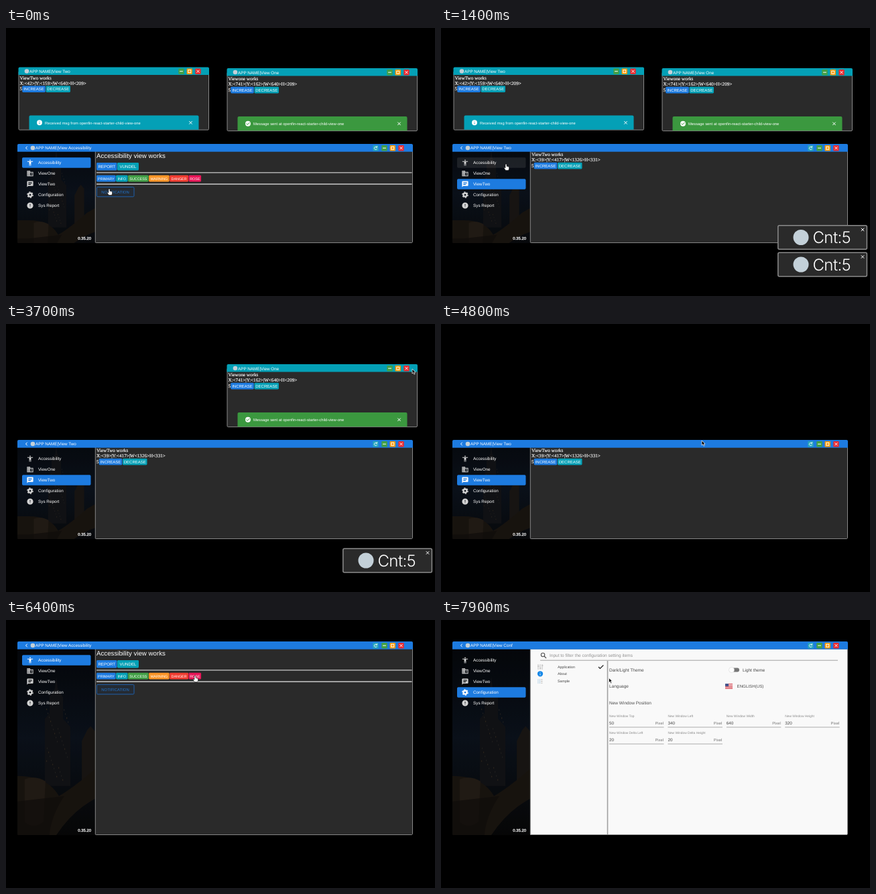
Recreate the animation shown at these times as an HTML page. Size 640x400 px, loop 8000 ms.

```html
<!DOCTYPE html>
<html lang="en">
<head>
<meta charset="utf-8">
<title>Multi window app</title>
<style>
html, body { margin: 0; width: 100%; height: 100%; overflow: hidden; background: #000; }
svg { display: block; width: 640px; height: 400px; font-family: "Liberation Sans", Arial, sans-serif; }
text { white-space: pre; text-rendering: geometricPrecision; }
.serif { font-family: "Liberation Serif", "Times New Roman", serif; stroke: #fff; stroke-width: .15px; }
.thin { font-family: Inter, sans-serif; font-weight: 300; }
</style>
</head>
<body>
<svg id="stage" viewBox="0 0 640 400"></svg>
<script>
const LOOP = 8000, STEP = 100;
const BLUE = '#1d7be0', TEAL = '#04a0b6', GREEN = '#3b983f', ORANGE = '#fb9426',
      RED = '#ea2a30', ROSE = '#e91457', DARK = '#2a2a2a', LOGO = '#c3d0d8';
const MAIN_BOTTOM = 321;

const views = [[0, 'acc'], [1100, 'two'], [1600, 'acc'], [2400, 'two'], [6100, 'acc'], [6900, 'two'], [7500, 'conf']];
const titles = { acc: 'Accessibility', two: 'Two', conf: 'Conf' };
const mainTop = [[4800, 173], [5500, 88], [5600, 32]];
const snackTop = [[6500, 321], [6600, 299], [6900, 299], [7000, 305], [7200, 321]];
const pointer = [
  [300, 154, 240], [1000, 75, 230], [1100, 75, 230], [1400, 97, 203], [1600, 96, 201], [1900, 90, 205],
  [2300, 73, 230], [2500, 73, 230], [2800, 628, 300], [2900, 628, 300], [3300, 286, 65], [3400, 286, 65],
  [3700, 606, 67], [3800, 598, 66], [3900, 598, 66], [4300, 628, 342], [4400, 628, 342], [4700, 389, 174],
  [4800, 389, 174], [5500, 389, 89], [5600, 389, 33], [5700, 389, 33], [6000, 85, 60], [6100, 85, 60],
  [6400, 282, 83], [6500, 282, 83], [6900, 88, 95], [7100, 88, 96], [7400, 80, 106], [7500, 80, 106], [7900, 250.5, 86.5]
];
const icons = {
  person: 'M12 2a2 2 0 110 4 2 2 0 010-4zM21 9h-6v13h-2v-6h-2v6H9V9H3V7h18z',
  house: 'M12 7V3H2v18h20V7zM4 5h2v2H4zM4 9h2v2H4zM4 13h2v2H4zM4 17h2v2H4zM8 5h2v2H8zM8 9h2v2H8zM8 13h2v2H8zM8 17h2v2H8zM12 9h8v10h-8zM15 11h3v2h-3zM15 15h3v2h-3z',
  chat: 'M20 2H4a2 2 0 00-2 2v18l4-4h14a2 2 0 002-2V4a2 2 0 00-2-2zM6 6h12v2H6zM6 9h12v2H6zM6 12h8v2H6z',
  alert: 'M12 2a10 10 0 100 20 10 10 0 000-20zM11 7h2v6h-2zM11 15h2v2h-2z',
  info: 'M12 2a10 10 0 100 20 10 10 0 000-20zM11 7h2v2h-2zM11 11h2v6h-2z',
  check: 'M12 2a10 10 0 100 20 10 10 0 000-20zM10 17l-5-5 1.4-1.4 3.6 3.6 7.6-7.6L19 8z',
  face: 'M12 2a10 10 0 100 20 10 10 0 000-20zM12 4a8 8 0 110 16 8 8 0 010-16zM7 8h4v4H7zM13 8h4v4h-4zM8 14h8l-4 3z'
};
const menu = [['Accessibility', 'person', 'acc'], ['ViewOne', 'house', 'one'], ['ViewTwo', 'chat', 'two'],
              ['Configuration', 'gear', 'conf'], ['Sys Report', 'alert', 'sys']];

function stateAt(keys, t) {
  let value = keys[0][1];
  for (const [time, v] of keys) if (time <= t) value = v;
  return value;
}
function tween(keys, t, i = 1) {
  if (t <= keys[0][0]) return keys[0][i];
  for (let k = 1; k < keys.length; k++) {
    const a = keys[k - 1], b = keys[k];
    if (t <= b[0]) return a[i] + (b[i] - a[i]) * (t - a[0]) / (b[0] - a[0]);
  }
  return keys[keys.length - 1][i];
}

const rect = (x, y, w, h, fill, r = 0, more = '') =>
  `<rect x="${x}" y="${y}" width="${w}" height="${h}" rx="${r}" fill="${fill}" ${more}/>`;
const text = (x, y, s, size, fill = '#fff', more = '') =>
  `<text x="${x}" y="${y}" font-size="${size}" fill="${fill}" ${more}>${s.replace(/</g, '&lt;')}</text>`;
const line = (d, color = '#fff', width = 1) => `<path d="${d}" fill="none" stroke="${color}" stroke-width="${width}"/>`;
const dot = (x, y, r, fill) => `<circle cx="${x}" cy="${y}" r="${r}" fill="${fill}"/>`;
const cross = (x, y, r, color = '#fff', width = 1) =>
  line(`M${x - r} ${y - r}l${2 * r} ${2 * r}m0 ${-2 * r}l${-2 * r} ${2 * r}`, color, width);
const at = (x, y, body) => `<g transform="translate(${x} ${y})">${body}</g>`;

function icon(name, x, y, size, fill = '#e6e6e6') {
  const k = size / 24;
  const body = name === 'gear'
    ? `<circle cx="12" cy="12" r="5.5" fill="none" stroke="${fill}" stroke-width="5"/>
       <circle cx="12" cy="12" r="9" fill="none" stroke="${fill}" stroke-width="3" stroke-dasharray="4.7"/>`
    : `<path d="${icons[name]}" fill="${fill}" fill-rule="evenodd"/>`;
  return `<g transform="translate(${x - size / 2} ${y - size / 2}) scale(${k})">${body}</g>`;
}

function button(x, y, w, h, label, fill, size = 6) {
  return rect(x, y, w, h, fill, 1.4) +
    text(x + w / 2, y + h / 2 + size * .36, label, size, '#fff', 'text-anchor="middle"');
}

function headerButtons(right, y, refresh) {
  const box = (x, fill) => rect(x - 4.2, y - 4.2, 8.4, 8.4, fill, 1.2);
  const red = right, orange = right - 12.7, green = right - 25, teal = right - 38;
  return (refresh ? box(teal, '#27a5bd') + line(`M${teal + 1.8} ${y - 1}a2.1 2.1 0 1 0 .2 1.900M${teal} ${y - 1}h2v-2`, '#fff', .8) : '') +
    box(green, '#43a047') + line(`M${green - 2.4} ${y}h4.8`, '#fff', 1) +
    box(orange, '#ff9800') + rect(orange - 2, y - 2, 4, 4, 'none', 0, 'stroke="#fff" stroke-width="1"') +
    box(red, RED) + cross(red, y, 2);
}

function counter(heading, bounds) {
  return text(2, 6.2, heading, 7.2, '#fff', 'class="serif"') +
    text(2, 14.2, bounds, 7.1, '#fff', 'class="serif"') +
    text(2, 22.7, '5', 7.1, '#fff', 'class="serif"') +
    button(5.7, 15.7, 34.6, 9.8, 'INCREASE', BLUE) + button(41, 15.7, 36.5, 9.8, 'DECREASE', TEAL);
}

function childWindow(x, y, name, heading, bounds, snack) {
  return at(x, y,
    rect(.5, 6, 283.5, 87.6, DARK, 1.5, 'stroke="#878787"') +
    `<path d="M0 11.6V2q0-2 2-2h280.500q2 0 2 2v9.600z" fill="${TEAL}"/>` +
    dot(12.5, 6, 3.3, LOGO) + text(16.5, 8.5, 'APP NAME|View ' + name, 6.3) +
    headerButtons(268, 6.2) +
    at(0, 12, counter(heading, bounds)) +
    `<path d="M16 93.300V74q0-2 2-2h249q2 0 2 2v19.300z" fill="${snack.fill}"/>` +
    icon(snack.icon, 31.5, 82.8, 9.5, '#fff') + text(39.5, 85, snack.label, 5.8) + cross(257, 82.8, 2.2));
}

// Dim skyline, scaled like a centred cover image
function skyline(height) {
  const k = Math.max(116 / 162, height / 288);
  const tx = 58 - 100 * k, ty = (height - 288 * k) / 2;
  let lights = '';
  for (let i = 0; i < 34; i++) {
    const x = 85 + (i * 17) % 33, y = 100 + (i * 29) % 110;
    lights += rect(x, y, 1.2, 2, i % 3 ? '#2b2a29' : '#3c3226');
  }
  return `<g transform="translate(${tx} ${ty}) scale(${k})">` +
    rect(0, 0, 200, 288, 'url(#sky)') +
    `<path d="M83 215V115l7-8V82l8-12 2-18 2 18 8 13v32l11 12v88z" fill="#15161a"/>` + lights +
    `<path d="M138 220v-72l8-16 5-6 7 8v86z" fill="#1f1b18"/>` +
    `<path d="M19 200h23q45 0 62 30 24-14 60-46l36-20v55q-62 12-100 69H19z" fill="#1f1913"/>` +
    `<path d="M53 205q15-6 31 3l-3 60q-15 12-28 0z" fill="#2a221a"/>` +
    `<path d="M19 238h23l70-8q-20 30-22 58H19z" fill="#15110e" opacity=".7"/></g>`;
}

function sidebar(height, t, tip) {
  const selected = stateAt(views, t - STEP), before = stateAt(views, t - 2 * STEP);
  let out = skyline(height) + rect(0, 0, 116, height, '#000', 0, 'opacity=".25"');
  menu.forEach(([label, glyph, key], i) => {
    const y = 28 + 16 * i;
    const hover = tip.item === i;
    const fill = key === selected ? (hover && key !== before ? '#1c50bd' : BLUE)
      : key === before ? '#24436f' : hover ? '#ffffff17' : 'none';
    out += rect(7, y - 7.8, 102.5, 15.6, fill, 1.8) + icon(glyph, 19, y, 11, key === selected ? '#fff' : '#d4d4d4') +
      text(31, y + 2.2, label, 6.35);
  });
  return out + text(110, height - 5, '0.35.20', 5.9, '#fff', 'text-anchor="end" stroke="#fff" stroke-width=".25"');
}

function accessibility() {
  const rows = [['PRIMARY', 28.6, BLUE], ['INFO', 17.5, TEAL], ['SUCCESS', 30.5, '#43a047'],
                ['WARNING', 30.5, ORANGE], ['DANGER', 28, '#f13c30'], ['ROSE', 18.5, ROSE]];
  let x = 118, out = text(118, 21, 'Accessibility view works', 9.7) +
    button(118, 28, 30.5, 11.4, 'REPORT', BLUE, 6.2) + button(149, 28, 32, 11.4, 'VUNDEL', TEAL, 6.2) +
    line('M118 42.800h470.500M118 60h470.500', '#c9c9c9', 1.3);
  for (const [label, w, fill] of rows) {
    out += button(x, 46.8, w, 9.6, label, fill, 5.4);
    x += w + .5;
  }
  return out + rect(118.4, 64.4, 55.6, 14.4, '#252b33', 1.5, 'stroke="#1e66b8" stroke-width=".9"') +
    text(146, 73.6, 'NOTIFICATION', 5.95, '#2175d0', 'text-anchor="middle"');
}

function field(x, y, label, value) {
  return text(x, y, label, 4.85, '#8a8a8a') + text(x, y + 10.6, value, 6.3, '#444') +
    text(x + 81, y + 10.6, 'Pixel', 5.8, '#777', 'text-anchor="end"') + line(`M${x} ${y + 15}h81.500`, '#999', .8);
}

function configuration() {
  const grey = '#4a4a4a';
  let out = rect(116, 11.5, 473, 277, '#f9f9f9') +
    `<circle cx="135" cy="20" r="2.700" fill="none" stroke="#555" stroke-width="1.100"/>` + line('M137 22l3 3', '#555', 1.3) +
    text(145, 22.5, 'Input to filter the configuration setting items', 6.5, '#919191') +
    line('M131 28.200h444', '#8c8c8c', .8) + line('M231.500 29v259.500', '#a0a0a0', 1.6);
  ['Application', 'About', 'Sample'].forEach((s, i) => out += text(157, 39.7 + 10.6 * i, s, 5.3, '#444'));
  out += line('M128 34v8m3-8v8m3-8v8M127 37h2.500m.500 3h2.500m.500-4h2.500', '#aaa', .7) + icon('info', 131, 48.3, 10, '#1688e8') +
    line('M128 56v7m2.500-7v7', '#b7d4e8', 1) + line('M132 57h2.500m-2.500 2.500h2.500m-2.500 2.500h2.500', '#aaa', .8) +
    line('M218 38l2.300 2.500 5-5', '#222', 1.2);
  out += text(234, 44.5, 'Dark/Light Theme', 6.5, grey) + rect(414, 39.6, 14, 5.8, '#777', 2.9) +
    `<circle cx="416.500" cy="42.500" r="4" fill="#fff" stroke="#ccc" stroke-width=".5"/>` +
    text(433, 44.6, 'Light theme', 6.4, grey) + text(234, 69.2, 'Language', 6.5, grey) +
    rect(407, 63, 11, 7.6, '#f4eeee') + line('M407 63.500h11m-11 2.200h11m-11 2.200h11m-11 2.200h11', '#d9434e', 1.1) +
    rect(407, 63, 5, 4, '#46548c') + text(424.5, 69.2, 'ENGLISH(US)', 6.2, grey) +
    text(234, 94, 'New Window Position', 6.5, grey);
  [['Top', 50], ['Left', 340], ['Width', 640], ['Height', 320], ['Delta Left', 20], ['Delta Height', 20]].forEach(([s, v], i) =>
    out += field(234 + 87.4 * (i % 4), 113 + 25 * (i > 3), 'New Window ' + s, String(v)));
  return out;
}

function mainWindow(t, tip, top, view) {
  const height = MAIN_BOTTOM - top, grown = (173 - top) / 141;
  const bounds = `X:<39>|Y:<${Math.round(417 - 317 * grown)}>|W<1326>H<${Math.round(331 + 317 * grown)}>`;
  const content = { acc: accessibility, conf: configuration,
    two: () => at(116, 12, counter('ViewTwo works', bounds)) }[view]();
  const y = tween(snackTop, t) - top;
  const snack = y < height ? at(231, y, rect(0, 0, 128.5, 22, ROSE, 1.5) + icon('face', 15.5, 11, 9.5, '#fff') +
    text(23.5, 13, 'Message to rose snackbar', 5.8) + cross(116.5, 11, 2.2)) : '';
  return at(17, top,
    `<clipPath id="frame"><rect width="590" height="${height}" rx="2"/></clipPath><g clip-path="url(#frame)">` +
    sidebar(height, t, tip) +
    rect(116, 6, 473.5, height - 6.5, DARK) + content + snack +
    rect(116.3, 6, 473.2, height - 6.5, 'none', 1, 'stroke="#858585"') +
    rect(0, 0, 590, 11.7, BLUE) +
    line('M14.700 3.700l-2.200 2.300 2.200 2.300', '#fff', 1) + dot(23, 6, 3.3, LOGO) +
    text(27, 8.4, 'APP NAME|View ' + titles[view], 6.3) + headerButtons(572.5, 6.2, true) + '</g>');
}

function toast(y) {
  return at(502, y, rect(.8, .8, 132.6, 35.4, DARK, 2, 'stroke="#8b8b8b" stroke-width="1.500"') +
    dot(35, 18.5, 11.5, LOGO) + text(52.5, 27.2, 'Cnt:5', 24, '#fff', 'class="thin" letter-spacing="-.6"') + cross(127, 7, 2.2));
}

function cursor(x, y, hand) {
  return at(x, y, hand
    ? `<path d="M-1 .500q1-1.200 2 0v2.800l3.500 1v3.200l-1 2h-4l-2.500-3.500 .500-1 1.500 1z" fill="#fff" stroke="#000" stroke-width=".5"/>`
    : `<path d="M0 0v7l1.600-1.500 1.300 2.700 1.300-.600-1.300-2.600h2.200z" fill="#000" stroke="#fff" stroke-width=".7"/>`);
}

function scene(t) {
  const view = stateAt(views, t), top = tween(mainTop, t);
  const x = tween(pointer, t, 1), y = tween(pointer, t, 2);
  const row = Math.round((y - top - 28) / 16);
  const tip = { item: x > 24 && x < 127 && row >= 0 && row < 5 ? row : -1 };
  const onButton = view === 'acc' && x > 135 && x < 292 && y > top + 28 && y < top + 80;
  const route = 'openfin-react-starter-child-view-one';
  return `<defs><linearGradient id="sky" x2="0" y2="1"><stop stop-color="#05070b"/>
      <stop offset=".5" stop-color="#0d1521"/><stop offset="1" stop-color="#080808"/></linearGradient></defs>` +
    rect(0, 0, 640, 400, '#000') +
    (t < 3400 ? childWindow(18.5, 58.5, 'Two', 'ViewTwo works', 'X:<42>|Y:<159>|W<640>H<209>',
      { fill: TEAL, icon: 'info', label: 'Received msg from ' + route }) : '') +
    (t < 3900 ? childWindow(329.5, 60, 'One', 'Viewone works', 'X:<741>|Y:<162>|W<640>H<209>',
      { fill: GREEN, icon: 'check', label: 'Message sent at ' + route }) : '') +
    mainWindow(t, tip, top, view) +
    (t >= 800 && t < 2800 ? toast(294) : '') + (t >= 500 && t < 4400 ? toast(334.5) : '') +
    cursor(x, y, tip.item >= 0 || onButton);
}

const stage = document.getElementById('stage');
const start = performance.now();
let shown = -1;
function tick() {
  const t = Math.floor(((performance.now() - start) % LOOP) / STEP) * STEP;
  if (t !== shown) {
    stage.innerHTML = scene(t);
    shown = t;
  }
  requestAnimationFrame(tick);
}
tick();
</script>
</body>
</html>
```
